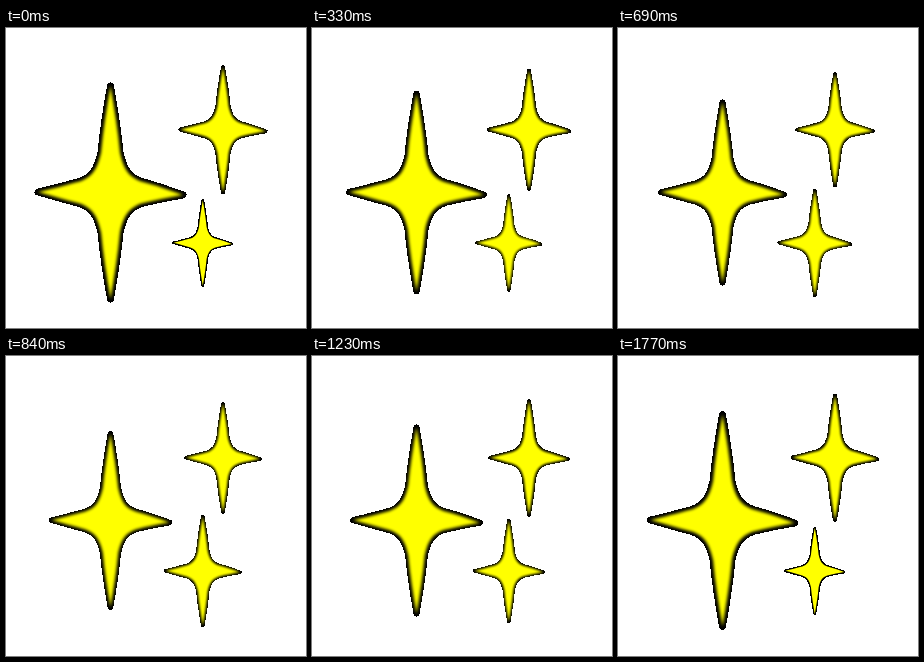
An HTML page for the animation above (1800 ms loop, 300 px wide and 300 px high).

```html
<!DOCTYPE html>
<html lang="en">
<head>
<meta charset="utf-8">
<title>Sparkles</title>
<style>
  html, body { margin: 0; width: 100%; height: 100%; overflow: hidden; background: #fff; }
  svg { display: block; width: 100vw; height: 100vh; }
</style>
</head>
<body>
<svg viewBox="0 0 300 300">
  <defs>
    <path id="outline" d="M0-106.5
      C4-84 7.5-62 9.5-40 C13.5-22 19-15.5 31-11 C45-7.5 60-2 72.5 2.5
      C60 4.5 45 7.5 31 11 C19 15.5 13.5 22 9.5 40 C7.5 62 4 84 0 106.5
      C-4 84-7.5 62-9.5 40 C-13.5 22-19 15.5-31 11 C-45 7.5-60 3-72.5-.5
      C-60-3-45-7.5-31-11 C-19-15.5-13.5-22-9.5-40 C-7.5-62-4-84 0-106.5Z"/>
    <filter id="soft" filterUnits="userSpaceOnUse" x="-90" y="-125" width="180" height="250" color-interpolation-filters="sRGB">
      <feGaussianBlur stdDeviation="1.8"/>
    </filter>
    <g id="star">
      <use href="#outline" stroke="#000" stroke-width="7" stroke-linejoin="round" shape-rendering="crispEdges"/>
      <use href="#outline" fill="#ff0" filter="url(#soft)"/>
    </g>
  </defs>
</svg>
<script>
  const LOOP = 1800, STEP = 30;
  // size runs from "from" to "to" and back, linearly
  const stars = [
    { x: 104.5, y: 164.5, from: 1, to: 0.8 },
    { x: 217, y: 101.8, from: 0.587, to: 0.587 * 0.86 },
    { x: 196.8, y: 215, from: 0.4, to: 0.4 * 1.3 }
  ];
  const svg = document.querySelector('svg');
  for (const star of stars) {
    star.node = document.createElementNS(svg.namespaceURI, 'use');
    star.node.setAttribute('href', '#star');
    svg.append(star.node);
  }

  function draw(ms) {
    const t = Math.floor((ms % LOOP) / STEP) * STEP / LOOP;
    const p = 1 - Math.abs(1 - 2 * t);
    for (const { node, x, y, from, to } of stars) {
      const size = from + (to - from) * p;
      node.setAttribute('transform', `translate(${x} ${y}) scale(${size})`);
    }
  }

  const start = performance.now();
  function tick() {
    draw(performance.now() - start);
    requestAnimationFrame(tick);
  }
  tick();
</script>
</body>
</html>
```
